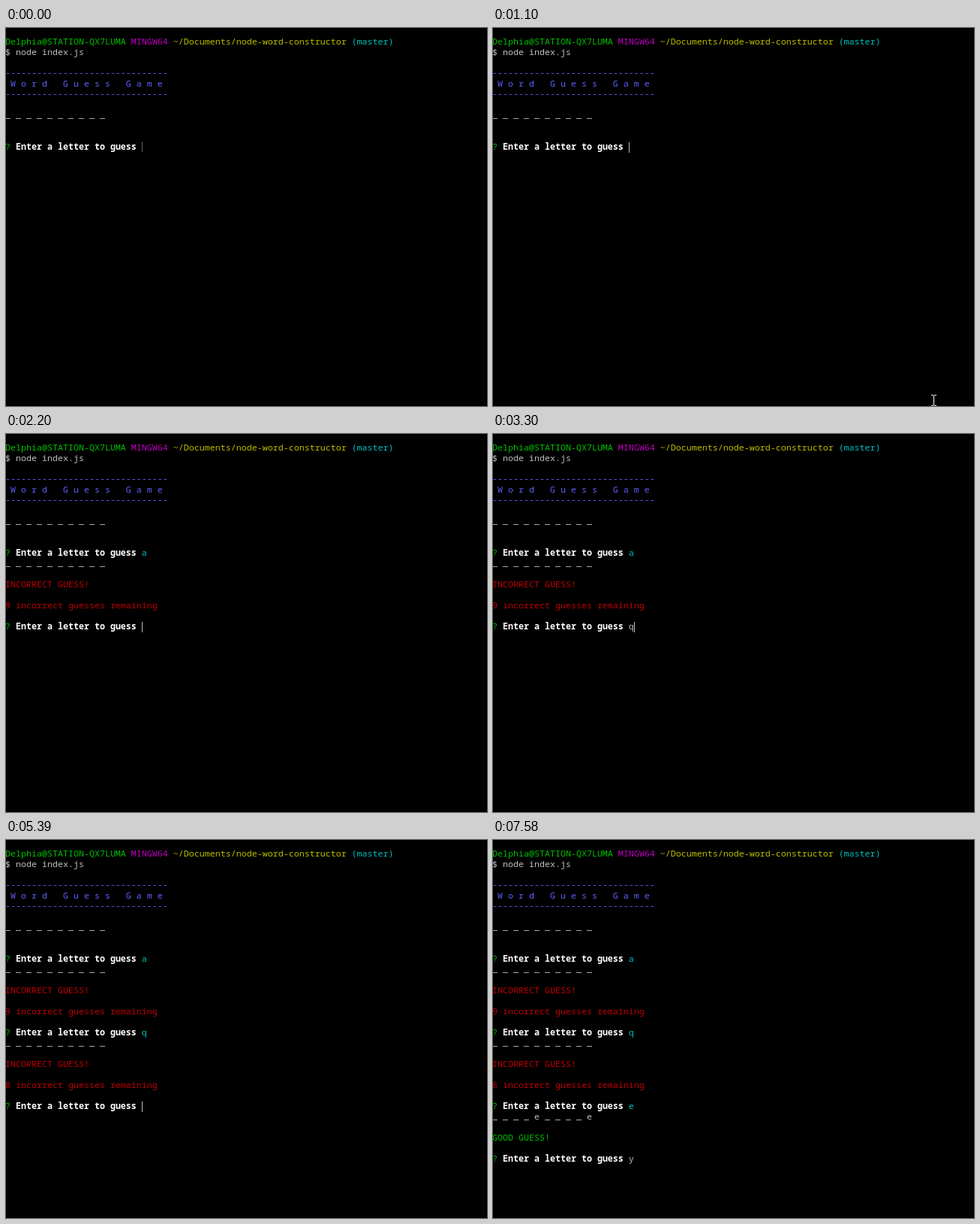
These frames come from a looping animation (641 by 503 pixels, 8 s). An HTML page:

```html
<!DOCTYPE html>
<html lang="en">
<head>
<meta charset="utf-8">
<title>Word Guess Game</title>
<style>
  html, body { margin: 0; width: 100%; height: 100%; overflow: hidden; background: #000; }
  pre {
    position: absolute; left: -1px; top: 11px; margin: 0; color: #bfbfbf;
    font: 500 11.667px/14px "Noto Sans Mono", "DejaVu Sans Mono", monospace;
    font-variant-ligatures: none;
  }
  .green { color: #00bf00 } .pink { color: #bf00bf } .yellow { color: #bfbf00 }
  .cyan { color: #00bfbf } .blue { color: #6060ff } .red { color: #bf0000 }
  .white { color: #fff; font-weight: 600 }
  .lift { position: relative; top: -1px }
  #caret { position: absolute; width: 1px; height: 14px; background: #bfbfbf; }
  #caret.idle { background: repeating-linear-gradient(#bfbfbf 0 1px, #000 1px 2px); }
  svg { position: absolute; left: 0; top: 0; fill: none; stroke: #fff; }
</style>
</head>
<body>
<pre id="screen"></pre>
<div id="caret"></div>
<svg width="641" height="503">
  <path id="pointer" shape-rendering="crispEdges" d="M-3 .5h3m1 0h3M.5 1v13M-3 14.5h3m1 0h3"/>
  <circle id="ring" cx="585" cy="494" r="11"/>
</svg>
<script>
const LOOP = 8000;
const $ = id => document.getElementById(id);
const paint = (style, text) => `<span class="${style}">${text}</span>`;
// Spaced letters of the word, with its blanks raised to the baseline
const word = letters => [...letters].join(" ").replace(/_/g, paint("lift", "_"));
const blanks = word("__________");
const rule = paint("blue lift", "-".repeat(31));
const prompt = paint("green", "?") + paint("white", " Enter a letter to guess ");
const miss = left =>
  [blanks, "", paint("red", "INCORRECT GUESS!"), "", paint("red", left + " incorrect guesses remaining"), ""];

const header = [
  paint("green", "Delphia@STATION-QX7LUMA") + " " + paint("pink", "MINGW64") + " " +
    paint("yellow", "~/Documents/node-word-constructor") + " " + paint("cyan", "(master)"),
  "$ node index.js", "",
  rule, paint("blue", " W o r d   G u e s s   G a m e"), rule, "",
  blanks, "", ""
];

// When each letter is typed, accepted and answered
const rounds = [
  { letter: "a", typed: 2050, sent: 2200, done: 2200, reply: miss(9) },
  { letter: "q", typed: 3300, sent: 4230, done: 4310, reply: miss(8) },
  { letter: "e", typed: 5790, sent: 6020, done: 6020,
    reply: [word("____e____e"), "", paint("green", "GOOD GUESS!"), ""] },
  { letter: "y", typed: 7030, sent: LOOP, done: LOOP, reply: [] }
];

const caretOff = [[1420, 1970], [2750, 3300], [3850, 4310], [4840, 5390], [6570, 7030], [7580, LOOP]];
const within = (t, [from, to]) => t >= from && t < to;

// Pointer stops: time, x, top
const stops = [[260, 585, 500], [340, 585, 495], [410, 586, 489], [490, 587, 484], [640, 587, 486], [730, 587, 488]];

let shown = "";
function draw(t) {
  const lines = [...header];
  let row, column;
  for (const { letter, typed, sent, done, reply } of rounds) {
    row = lines.length;
    column = t < typed ? 26 : 27;
    lines.push(prompt + (t < typed ? "" : t < sent ? letter : paint("cyan", letter)));
    if (t < done) break;
    lines.push(...reply);
  }
  const html = lines.join("\n");
  if (html !== shown) $("screen").innerHTML = shown = html;

  const caret = $("caret");
  caret.className = t < 870 ? "idle" : "";
  caret.style.left = column * 7 - 1 + "px";
  caret.style.top = 12 + row * 14 + "px";
  caret.style.visibility = caretOff.some(span => within(t, span)) ? "hidden" : "visible";

  const stop = stops.filter(s => s[0] <= t).pop();
  $("pointer").style.display = stop && t < 2050 ? "" : "none";
  if (stop) $("pointer").setAttribute("transform", `translate(${stop[1]} ${stop[2]})`);
  $("ring").style.display = within(t, [870, 1100]) ? "" : "none";
}

const start = performance.now();
function tick() {
  draw((performance.now() - start) % LOOP);
  requestAnimationFrame(tick);
}
tick();
</script>
</body>
</html>
```
